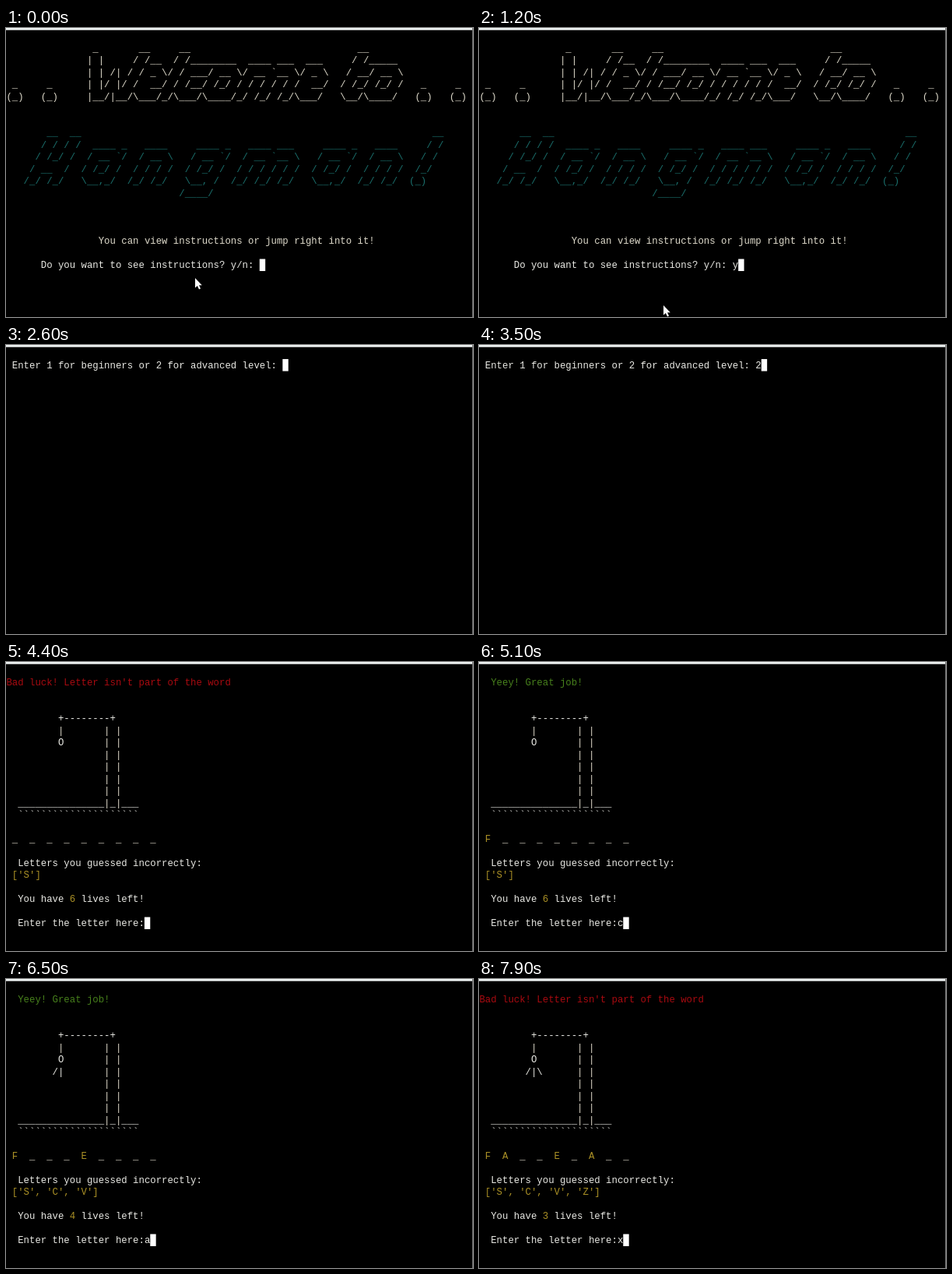
Recreate the animation shown at these times as an HTML page with a canvas. Size 600 px wide and 371 px high, loop 8000 ms.

```html
<!DOCTYPE html>
<html lang="en">
<head>
<meta charset="utf-8">
<title>Hangman terminal</title>
<style>
  html, body { margin: 0; width: 100%; height: 100%; overflow: hidden; background: #000; }
  canvas { display: block; }
</style>
</head>
<body>
<canvas id="stage" width="600" height="371"></canvas>
<script>
const ctx = document.getElementById('stage').getContext('2d');
const LOOP = 8000;
const CELL = 7.395, LINE = 15.47, LEFT = 0.4, TOP = 2.6;
const WHITE = '#e9e9e4', CREAM = '#dedacb', RED = '#a80a10', GREEN = '#47801c',
      YELLOW = '#ab9126', TEAL = '#1a6f6c';

const WELCOME = [
  ' _       __     __                             __',
  '| |     / /__  / /________  ____ ___  ___     / /_____',
  '| | /| / / _ \\/ / ___/ __ \\/ __ `__ \\/ _ \\   / __/ __ \\',
  '| |/ |/ /  __/ / /__/ /_/ / / / / / /  __/  / /_/ /_/ /',
  '|__/|__/\\___/_/\\___/\\____/_/ /_/ /_/\\___/   \\__/\\____/'
];
const GLYPHS = {
  H: ['    __  __', '   / / / /', '  / /_/ /', ' / __  /', '/_/ /_/'],
  a: ['', '  ____ _', ' / __ `/', '/ /_/ /', '\\__,_/'],
  n: ['', '   ____', '  / __ \\', ' / / / /', '/_/ /_/'],
  g: ['', '   ____ _', '  / __ `/', ' / /_/ /', ' \\__, /', '/____/'],
  m: ['', '   ____ ___', '  / __ `__ \\', ' / / / / / /', '/_/ /_/ /_/'],
  '!': ['    __', '   / /', '  / /', ' /_/', '(_)']
};
const TITLE = [['H', 3], ['a', 13], ['n', 21], ['g', 30], ['m', 39], ['a', 53], ['n', 61], ['!', 70]];

// Known letters of the word; dots are never revealed.
const WORD = 'FA..E.A..';
// key, time typed, time entered, time of the next screen
const TURNS = [
  ['s', 4200, 4300, 4400],
  ['f', 4600, 4700, 4800],
  ['c', 5100, 5300, 5300],
  ['v', 5500, 5800, 5800],
  ['e', 6000, 6200, 6300],
  ['a', 6500, 6700, 6800],
  ['z', 7300, 7600, 7600],
  ['x', 7900, LOOP, LOOP]
];
const POINTER = [[0, 243, 321], [100, 242, 333], [200, 240, 347], [300, 239, 361], [500, 238, 359], [600, 237, 356]];

function put(row, col, text, color = WHITE) {
  ctx.fillStyle = color;
  const y = TOP + row * LINE + 11.8;
  [...text].forEach((ch, i) => {
    if (ch !== ' ') ctx.fillText(ch, LEFT + (col + i) * CELL, y);
  });
}

function block(row, col) {
  ctx.fillStyle = '#fff';
  ctx.fillRect(LEFT + col * CELL, TOP + row * LINE, CELL, LINE);
}

function prompt(row, col, text, typed = '') {
  put(row, col, text + typed);
  block(row, col + text.length + typed.length);
}

function intro(t) {
  WELCOME.forEach((line, i) => put(1 + i, 14, line, CREAM));
  for (const col of [0, 6, 71, 77]) {
    put(4, col + 1, '_', CREAM);
    put(5, col, '(_)', CREAM);
  }
  for (const [ch, col] of TITLE) {
    GLYPHS[ch].forEach((line, i) => put(8 + i, col, line, TEAL));
  }
  put(17, 16, 'You can view instructions or jump right into it!', CREAM);
  prompt(19, 6, 'Do you want to see instructions? y/n: ', t >= 1200 ? 'y' : '');
}

function gallows(row, misses) {
  put(row, 9, '+--------+');
  put(row + 1, 9, '|', CREAM);
  for (let i = 1; i <= 7; i++) {
    put(row + i, 17, '|', CREAM);
    put(row + i, 19, '|', CREAM);
  }
  if (misses > 0) put(row + 2, 9, 'O');
  if (misses > 1) put(row + 3, 9, '|');
  if (misses > 2) put(row + 3, 8, '/');
  if (misses > 3) put(row + 3, 10, '\\');
  put(row + 7, 2, '_'.repeat(15) + ' _ ___');
  put(row + 8, 2, '`'.repeat(21));
}

function game(t) {
  const played = TURNS.filter(turn => t >= turn[3]).map(turn => turn[0].toUpperCase());
  const wrong = played.filter(key => !WORD.includes(key));
  const last = played[played.length - 1];
  const top = last ? 4 : 1;

  if (last && WORD.includes(last)) put(1, 2, 'Yeey! Great job!', GREEN);
  else if (last) put(1, 0, "Bad luck! Letter isn't part of the word", RED);

  gallows(top, wrong.length);
  [...WORD].forEach((ch, i) => {
    const found = played.includes(ch);
    put(top + 10, 1 + i * 3, found ? ch : '_', found ? YELLOW : CREAM);
  });
  put(top + 12, 2, 'Letters you guessed incorrectly:');
  put(top + 13, 1, '[' + wrong.map(key => `'${key}'`).join(', ') + ']', YELLOW);
  put(top + 15, 2, 'You have   lives left!');
  put(top + 15, 11, String(7 - wrong.length), YELLOW);

  const [key, typedAt, enteredAt] = TURNS[played.length];
  const ask = 'Enter the letter here:';
  if (t >= enteredAt) {
    put(top + 17, 2, ask + key);
    block(top + 18, 0);
  } else {
    prompt(top + 17, 2, ask, t >= typedAt ? key : '');
  }
}

function pointer(t) {
  if (t >= 2000) return;
  const [, x, y] = POINTER.filter(p => t >= p[0]).pop();
  ctx.save();
  ctx.translate(x, y);
  ctx.fillStyle = '#fff';
  ctx.fill(new Path2D('M0 0V12.5L2.9 9.9L5 14.4L7 13.5L5 9.2H8.8Z'));
  ctx.restore();
}

function frameEdges() {
  ctx.fillStyle = '#eef3f2';
  ctx.fillRect(0, 0, 600, 2.7);
  ctx.fillStyle = '#777';
  ctx.fillRect(599, 0, 1, 371);
}

function draw(t) {
  ctx.fillStyle = '#000';
  ctx.fillRect(0, 0, 600, 371);
  frameEdges();
  ctx.font = '12.32px "Liberation Mono", "Courier New", monospace';
  ctx.textBaseline = 'alphabetic';

  if (t < 1600) intro(t);
  else if (t < 2600) prompt(2, 24, 'Guess the hidden word!');
  else if (t < 3600) prompt(1, 1, 'Enter 1 for beginners or 2 for advanced level: ', t >= 3500 ? '2' : '');
  else game(t);
  pointer(t);
}

const start = performance.now();
function tick() {
  draw((performance.now() - start) % LOOP);
  requestAnimationFrame(tick);
}
tick();
</script>
</body>
</html>
```
